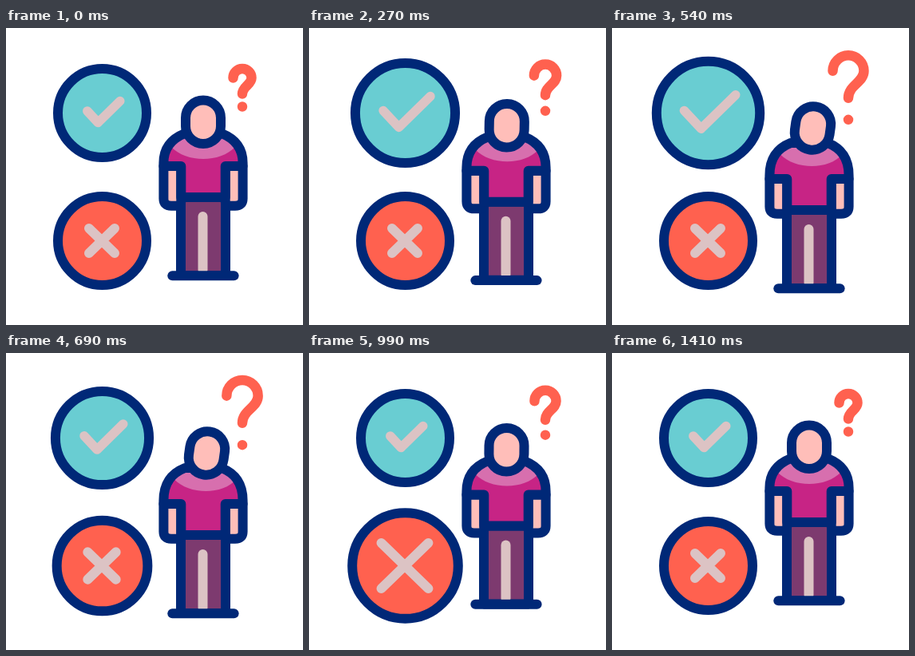
These frames come from a looping animation (372 by 372 pixels, 1500 ms). An HTML page:

```html
<!DOCTYPE html>
<html lang="en">
<head>
<meta charset="utf-8">
<style>
  html, body { margin: 0; width: 100%; height: 100%; overflow: hidden; background: #fff; }
  svg { display: block; width: 100%; height: 100%; }
  path, circle { stroke-linecap: round; stroke-linejoin: round; stroke-width: 12; }
  .line { fill: none; }
  .ink { stroke: #002877; }
  .pale { stroke: #dcc3c4; }
</style>
</head>
<body>
<svg viewBox="0 0 372 372">
  <circle id="yesDisc" class="ink" cx="120.5" cy="106.5" fill="#69cdd2"/>
  <path id="yesMark" class="line pale" d="M-20 -1L-6.5 13.5L21 -13.5"/>
  <circle id="noDisc" class="ink" cx="120.5" cy="266.5" fill="#ff614f"/>
  <path id="noMark" class="line pale" d="M-16 -15.5L16 15.5M16 -15.5L-16 15.5"/>
  <path id="question" class="line" stroke="#ff614f"
    d="M-11.5 -12.5A11.5 11.5 0 0 1 11.5 -12.5C11.5 -4 0 -2 0 7.5M0 23.5h.01"/>
  <g id="legs">
    <path class="ink" fill="#7d3a6f" d="M219 212H275V310H219Z"/>
    <path class="line pale" d="M246.5 236V303"/>
    <path class="line ink" d="M208.3 310.3H285.6"/>
  </g>
  <path id="arms" class="ink" fill="#ffbeb9"/>
  <path id="shirt" fill="#c72485"/>
  <path id="collar" fill="#d76fae"/>
  <path id="outline" class="line ink"/>
  <path id="head" class="ink" fill="#ffbeb9"
    d="M225 112.5a22 22 0 0 1 44 0V123a22 22 0 0 1 -44 0Z"/>
</svg>
<script>
const LOOP = 1500, STEP = 30;
const $ = id => document.getElementById(id);
const set = (id, name, value) => $(id).setAttribute(name, value);

function ease(t, from, to) {
  const p = Math.min(1, Math.max(0, (t - from) / (to - from)));
  return p * p * (3 - 2 * p);
}
const swell = (t, up, top, down, end) => ease(t, up, top) - ease(t, down, end);
const pulse = t => swell(t, 80, 395, 450, 820);

// Scales a mark around its origin while its line weight stays constant.
function grow(id, x, y, scale, weight) {
  set(id, 'transform', `translate(${x} ${y}) scale(${scale})`);
  $(id).style.strokeWidth = weight / scale;
}

function drawBody(k) {
  const lower = 16 * k, hem = 173 + lower, belt = 212 + lower, hand = 222.7 + 10 * k;
  const neck = 132 + 12 * k, bend = 149 + 12 * k, edge = 149 + 9 * k, lean = 3.5 * k;
  const shirt = `M197.4 ${hem}V${hem - 4}C197.4 ${bend} 209 ${neck + 6} 224 ${neck}H270`
    + `C285 ${neck + 6} 296.6 ${bend} 296.6 ${hem - 4}V${hem}H274.7V${belt}H219.3V${hem}Z`;
  const arms = `M197.4 ${hem}V${hand - 9}Q197.4 ${hand} 207 ${hand}H213Q219.3 ${hand} 219.3 ${hand - 6}V${hem}Z`
    + `M296.6 ${hem}V${hand - 9}Q296.6 ${hand} 287 ${hand}H281Q274.7 ${hand} 274.7 ${hand - 6}V${hem}Z`;
  set('legs', 'transform', `translate(0 ${lower})`);
  set('arms', 'd', arms);
  set('shirt', 'd', shirt);
  set('collar', 'd', `M${207 + lean} ${edge}C${226 + lean} ${edge + 20} ${268 + lean} ${edge + 20} `
    + `${287 + lean / 2} ${edge}L270 ${neck}H224Z`);
  set('outline', 'd', shirt);
  // The head sinks first and tilts later.
  set('head', 'transform',
    `translate(${0.7 * k} ${7.5 * k * (2 - k)}) rotate(${8 * k * k} 247 145)`);
}

function draw(t) {
  const yes = pulse(t), no = pulse(t - 540);
  set('yesDisc', 'r', 55.5 + 10.8 * yes);
  set('noDisc', 'r', 55.5 + 10.8 * no);
  grow('yesMark', 121.8, 105, 1 + 0.67 * yes, 11.5);
  grow('noMark', 120, 266.5, 1 + 0.84 * no, 12);
  grow('question', 296, 75, 1 + 0.71 * swell(t, 80, 585, 680, 1140), 12.5);
  drawBody(swell(t, 70, 560, 685, 1150));
}

function tick() {
  draw(Math.floor(performance.now() % LOOP / STEP) * STEP);
  requestAnimationFrame(tick);
}
tick();
</script>
</body>
</html>
```
